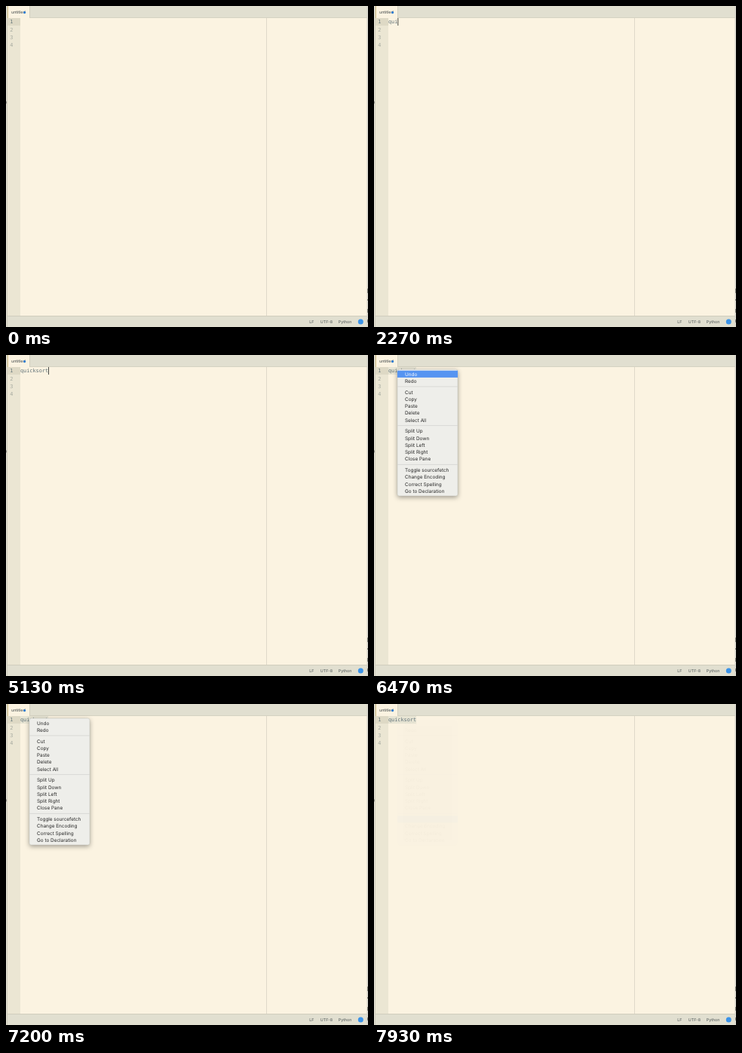
Recreate the animation shown at these times as an HTML page with a canvas. Size 480 by 426 pixels, loop 8000 ms.

```html
<!DOCTYPE html>
<html lang="en">
<head>
<meta charset="utf-8">
<title>Editor</title>
<style>
  html, body { margin: 0; width: 100%; height: 100%; overflow: hidden; background: #fbf3e1; }
  canvas { display: block; width: 480px; height: 426px; }
</style>
</head>
<body>
<canvas id="stage"></canvas>
<script>
const W = 480, H = 426, LOOP = 8000;
const MONO = '6.83px "DejaVu Sans Mono", monospace';
const UI = '5.3px Inter, sans-serif';
const MENU = '6.4px Inter, sans-serif';
const TEXT_X = 19, CHAR_W = 4.11;

const WORD = 'quicksort';
const KEY_TIMES = [2000, 2130, 2270, 2470, 2600, 2730, 2930, 3070, 3270];
const CARET_ON = [[70, 400], [870, 1270], [1670, 3730], [4130, 4530], [4930, 5330]];
const SELECT_AT = 5600;

const MENU_AT = 6470, PICK_AT = 7270, FLASH_AT = 7540, FADE_AT = 7670, FADE_END = 7930;
const GROUPS = [
  ['Undo', 'Redo'],
  ['Cut', 'Copy', 'Paste', 'Delete', 'Select All'],
  ['Split Up', 'Split Down', 'Split Left', 'Split Right', 'Close Pane'],
  ['Toggle sourcefetch', 'Change Encoding', 'Correct Spelling', 'Go to Declaration']
];
const ROW_H = 9.2, GAP = 5.7;
const items = [];
GROUPS.forEach((group, g) => group.forEach(label =>
  items.push({ label, y: 25.3 + ROW_H * items.length + GAP * g })));
const PICKED = items.find(item => item.label === 'Toggle sourcefetch');

const canvas = document.getElementById('stage');
const ctx = canvas.getContext('2d');
const scale = window.devicePixelRatio || 1;
canvas.width = W * scale;
canvas.height = H * scale;

function rect(x, y, w, h, color) {
  ctx.fillStyle = color;
  ctx.fillRect(x, y, w, h);
}

function text(str, x, y, font, color) {
  ctx.font = font;
  ctx.fillStyle = color;
  ctx.fillText(str, x, y);
}

function dot(x, y, r, color) {
  ctx.fillStyle = color;
  ctx.beginPath();
  ctx.arc(x, y, r, 0, Math.PI * 2);
  ctx.fill();
}

function drawWindow() {
  rect(0, 0, W, H, '#fbf3e1');

  // gutter
  rect(2, 16, 17, 396, '#ebe6d3');
  rect(2, 16, 17, 10, '#ded9c5');
  for (let i = 0; i < 4; i++) {
    text(String(i + 1), 5.2, 23.4 + i * 10.1, MONO, i ? '#a5a99f' : '#66777a');
  }
  rect(345, 16, 1, 396, '#dfd9c9');

  // tab bar
  rect(0, 0, W, 16, '#e1dfd0');
  rect(0, 15, W, 1, '#d5d2c2');
  rect(2, 0, 29, 16, '#fbf3e1');
  rect(2, 0, 1, 16, '#d8c48c');
  rect(31, 0, 1, 15, '#d2cfbf');
  text('untitled', 7, 10, UI, '#3c4446');
  dot(24.6, 8.6, 1.6, '#2f7fd6');

  // status bar
  rect(0, 411, W, 15, '#e1dfd0');
  rect(0, 411, W, 1, '#d0cdbd');
  text('LF', 402.2, 420.9, UI, '#4d5556');
  text('UTF-8', 416.8, 420.9, UI, '#4d5556');
  text('Python', 440.8, 420.9, UI, '#4d5556');
  dot(470.3, 419, 3.5, '#3b93e8');

  // window edges
  rect(0, 0, 1, H, '#e4e1d3');
  rect(1, 0, 1, H, '#cfccbd');
  rect(0, 126.5, 1, 3, '#8f8f88');
  rect(478.5, 0, 1.5, H, '#d3d1c8');
  [[375, 6], [389, 2], [402, 5], [416, 4]].forEach(([y, h]) => rect(479, y, 1, h, '#77776f'));
}

function drawText(t) {
  const count = KEY_TIMES.filter(k => t >= k).length;
  const end = TEXT_X + count * CHAR_W;
  if (t >= SELECT_AT) rect(TEXT_X, 16, end - TEXT_X, 10, '#e7e4d3');
  text(WORD.slice(0, count), TEXT_X, 23.2, MONO, '#5e7076');
  if (CARET_ON.some(([a, b]) => t >= a && t < b)) rect(end, 16, 1, 10, '#4c4c48');
}

function hoveredItem(t) {
  if (t >= FLASH_AT && t < FLASH_AT + 65) return null;
  if (t >= PICK_AT) return PICKED;
  // the pointer slides down to the gap above the last group
  const y = 25.3 + 120 * Math.min(1, (t - MENU_AT) / 725);
  return items.find(item => Math.abs(item.y - y) <= ROW_H / 2);
}

function drawMenu(t) {
  if (t < MENU_AT) return;
  const fade = Math.min(1, Math.max(0, (t - FADE_AT) / (FADE_END - FADE_AT)));
  ctx.save();
  ctx.globalAlpha = 1 - 0.975 * fade;

  ctx.save();
  ctx.shadowColor = 'rgba(0,0,0,0.38)';
  ctx.shadowBlur = 6 * scale;
  ctx.shadowOffsetY = 2 * scale;
  ctx.fillStyle = '#eeeeea';
  ctx.beginPath();
  ctx.roundRect(31, 19, 80, 168, 2.5);
  ctx.fill();
  ctx.restore();
  ctx.strokeStyle = '#c3c2bb';
  ctx.lineWidth = 0.5;
  ctx.stroke();

  let row = 0;
  GROUPS.slice(0, -1).forEach(group => {
    row += group.length;
    rect(31, (items[row - 1].y + items[row].y) / 2 - 0.5, 80, 1, '#d9d9d5');
  });

  const hover = hoveredItem(t);
  items.forEach(item => {
    const on = item === hover;
    if (on) rect(31, item.y - ROW_H / 2, 80, ROW_H, '#5694f1');
    text(item.label, 41, item.y + 2.3, MENU, on ? '#ffffff' : '#262626');
  });
  ctx.restore();
}

function frame() {
  const t = performance.now() % LOOP;
  ctx.setTransform(scale, 0, 0, scale, 0, 0);
  ctx.textRendering = 'geometricPrecision';
  drawWindow();
  drawText(t);
  drawMenu(t);
  requestAnimationFrame(frame);
}
frame();
</script>
</body>
</html>
```
